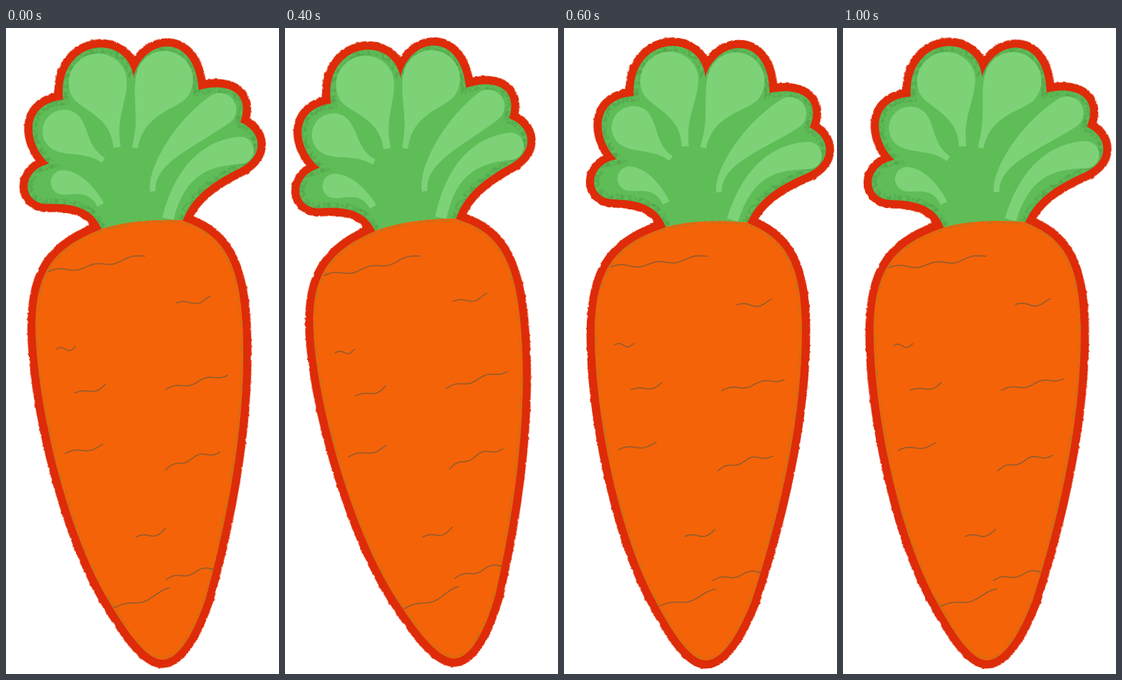
These frames come from a looping animation (382 px wide and 901 px high, 1200 ms). An HTML page:

```html
<!DOCTYPE html>
<html lang="en">
<head>
<meta charset="utf-8">
<title>Wobbling carrot</title>
<style>
html, body { margin: 0; width: 100%; height: 100%; overflow: hidden; background: #fff; }
svg { display: block; width: 100%; height: 100%; }
</style>
</head>
<body>
<svg viewBox="0 0 382 901">
  <defs>
    <filter id="rough" x="-10%" y="-10%" width="120%" height="120%" color-interpolation-filters="sRGB">
      <feTurbulence type="fractalNoise" baseFrequency=".2" numOctaves="2" seed="4"/>
      <feDisplacementMap in="SourceGraphic" scale="3" xChannelSelector="R" yChannelSelector="G"/>
    </filter>
    <filter id="grain" x="-5%" y="-5%" width="110%" height="110%" color-interpolation-filters="sRGB">
      <feTurbulence type="fractalNoise" baseFrequency=".2" numOctaves="3" seed="8"/>
      <feColorMatrix values="0 0 0 0 0  0 0 0 0 0  0 0 0 0 0  4 0 0 0 -1.5"/>
      <feComposite in="SourceGraphic" operator="in"/>
    </filter>
    <path id="leaves" d="M146,290 C138,250 110,240 70,239 C32,238 33,190 74,183 C45,155 40,98 98,95
      C93,10 192,4 198,68 C215,14 287,8 288,91 C325,82 362,95 344,139 C372,152 378,186 340,203
      C300,220 270,240 256,273 L250,290Z"/>
    <path id="root" d="M145,277 C180,268 220,268 255,271 C300,290 333,315 333,420 C333,540 305,670 262,800
      C240,855 218,882 198,882 C178,882 155,850 130,803 C80,715 44,550 43,430 C43,330 75,300 145,277Z"/>
    <clipPath id="inLeaves"><use href="#leaves"/></clipPath>
    <clipPath id="inRoot"><use href="#root"/></clipPath>
  </defs>
  <g id="carrot">
    <g fill="#de2b09" stroke="#de2b09" stroke-width="23" stroke-linejoin="round" filter="url(#rough)">
      <use href="#leaves"/><use href="#root"/>
    </g>
    <use href="#leaves" fill="#5fbd58"/>
    <g clip-path="url(#inLeaves)">
      <use href="#leaves" fill="none" stroke="#55a84c" stroke-width="15" filter="url(#grain)"/>
    </g>
    <path id="petals" fill="#7dd278"/>
    <use href="#root" fill="#f56308"/>
    <g clip-path="url(#inRoot)">
      <use href="#root" fill="none" stroke="#cf6d16" stroke-width="8" filter="url(#grain)"/>
    </g>
    <path id="wrinkles" fill="none" stroke="#985c2c" stroke-width="1.7" stroke-linecap="round"/>
  </g>
</svg>
<script>
const $ = id => document.getElementById(id);
const steps = n => Array.from({ length: n + 1 }, (_, i) => i / n);
const join = pts => pts.map(p => p.map(v => v.toFixed(1))).join('L');

// Teardrop along a bent spine: tip, bend, centre of the round head, half widths at tip and head.
function petal([x0, y0, x1, y1, x2, y2, tip, head]) {
  const sides = [-1, 1].map(side => steps(16).map(t => {
    const bez = (a, b, c) => (1 - t) ** 2 * a + 2 * t * (1 - t) * b + t * t * c;
    const slope = (a, b, c) => (1 - t) * (b - a) + t * (c - b);
    const dx = slope(x0, x1, x2), dy = slope(y0, y1, y2);
    const u = t ** 1.4, w = side * (tip + (head - tip) * u * u * (3 - 2 * u)) / Math.hypot(dx, dy);
    return [bez(x0, x1, x2) - dy * w, bez(y0, y1, y2) + dx * w];
  }));
  const [end, ...back] = sides[1].reverse();
  return `M${join(sides[0])}A${head},${head} 0 0 1 ${end}L${join(back)}Z`;
}

// Wavy pencil line rising to the right.
function wrinkle([x, y, length, rise, waves, sag]) {
  return 'M' + join(steps(24).map(t => [
    x + length * t,
    y - rise * t - 2.5 * Math.sin(2 * Math.PI * waves * t) + 4 * sag * t * (1 - t)
  ]));
}

$('petals').setAttribute('d', [
  [170, 165, 167, 120, 148, 74, 5, 41],
  [195, 167, 207, 118, 241, 74, 4, 40],
  [217, 229, 213, 185, 317, 119, 4, 23],
  [236, 268, 262, 180, 342, 178, 8, 19],
  [150, 182, 128, 167, 96, 138, 4, 30],
  [143, 244, 130, 215, 92, 210, 5, 17]
].map(petal).join(''));

$('wrinkles').setAttribute('d', [
  [66, 333, 135, 16, 2.6, 3],
  [242, 386, 48, 5, 1.2, 3],
  [71, 442, 27, 1, 1.1, 1],
  [94, 504, 43, 10, 1, 4],
  [221, 506, 87, 17, 1.9, 0],
  [76, 588, 53, 9, 1.1, 1],
  [215, 618, 77, 21, 2, -4],
  [169, 709, 42, 8, 1.1, 3],
  [208, 771, 67, 13, 1.6, -1],
  [134, 806, 78, 22, 1.4, 3]
].map(wrinkle).join(''));

// Tilt in degrees, each pose held for 200 ms.
const tilts = [-2.9, 0, -5.4, -0.05, -5.1, -0.5];

function draw() {
  const pose = Math.floor(performance.now() / 200) % tilts.length;
  $('carrot').setAttribute('transform', `rotate(${tilts[pose]} 190 455)`);
  requestAnimationFrame(draw);
}
draw();
</script>
</body>
</html>
```
